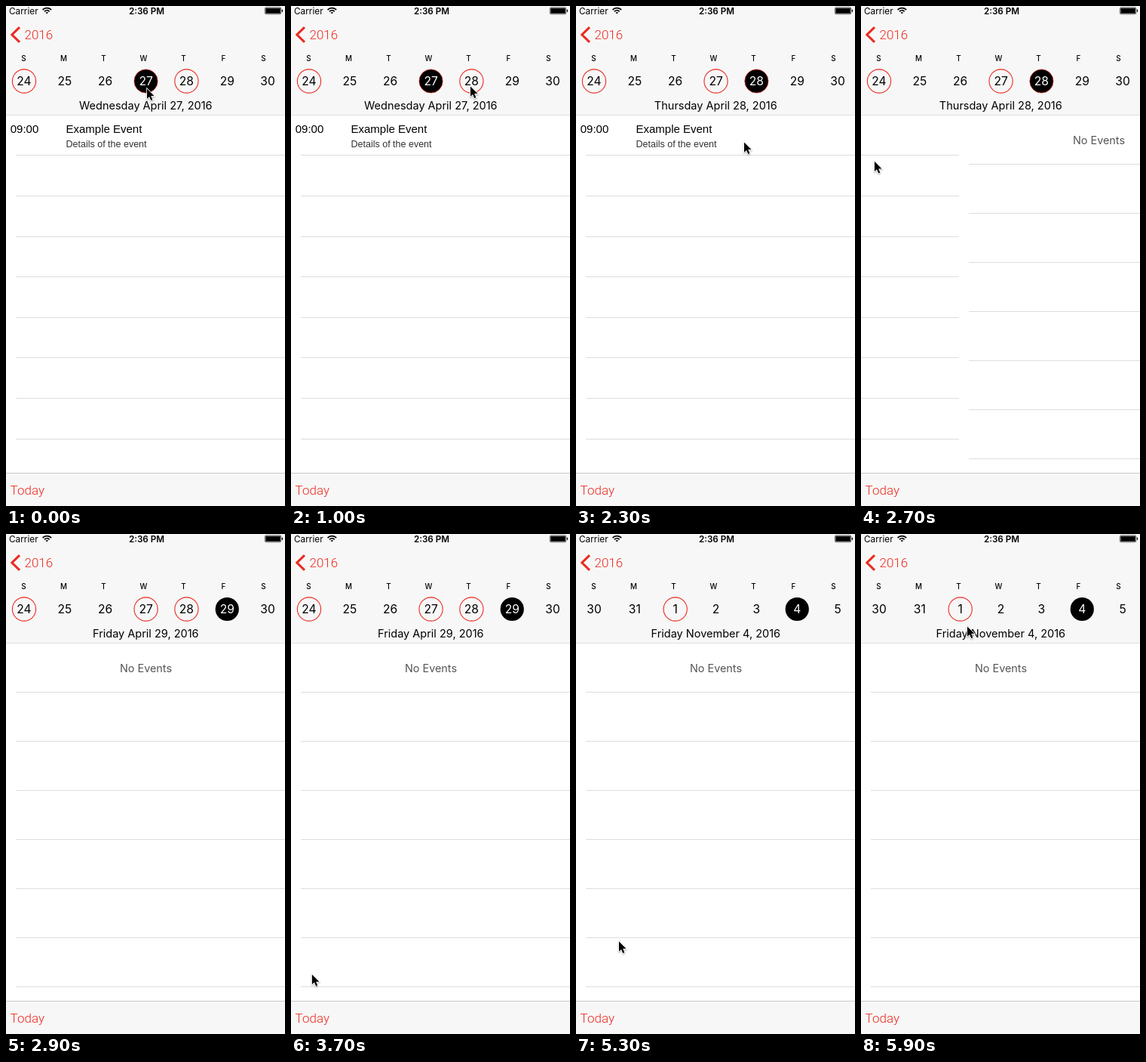
An HTML page with a canvas that plays this animation: 370 px wide and 662 px high, repeating every 6.1 s.

```html
<!DOCTYPE html>
<html lang="en">
<head>
<meta charset="utf-8">
<title>Calendar day view</title>
<style>
  html, body { margin: 0; width: 100%; height: 100%; overflow: hidden; background: #fff; }
  canvas { display: block; width: 370px; height: 662px; }
</style>
</head>
<body>
<canvas id="stage"></canvas>
<script>
const W = 370, H = 662, LOOP = 6100, TICK = 100;
const RED = '#ec2a20', BAR = '#f7f7f7', LINE = '#dddde0';
const UI = 'Inter, sans-serif';
const BODY = '"Liberation Sans", Arial, sans-serif';
const LIGHT = 'Roboto, sans-serif';

const canvas = document.getElementById('stage');
const ctx = canvas.getContext('2d');
const ratio = window.devicePixelRatio || 1;
canvas.width = W * ratio;
canvas.height = H * ratio;

const DAYS = [
  { from: 0, date: new Date(2016, 3, 27) },
  { from: 1700, date: new Date(2016, 3, 28) },
  { from: 2800, date: new Date(2016, 3, 29) },
  { from: 4200, date: new Date(2016, 10, 4) }
];

// Each slide brings in the next day's list from the right.
const SLIDES = [
  { start: 1680, length: 300, from: eventList, to: eventList },
  { start: 2400, length: 500, from: eventList, to: emptyList },
  { start: 4183, length: 300, from: emptyList, to: emptyList }
];

// The pointer rests between moves.
const MOVES = [
  { start: 0, end: 400, x: 36, y: 36 },
  { start: 400, end: 600, x: 236, y: 110 },
  { start: 600, end: 700, x: 198, y: 107 },
  { start: 700, end: 1000, x: 238, y: 106 },
  { start: 1900, end: 2300, x: 223, y: 180 },
  { start: 2400, end: 2800, x: -20, y: 210 },
  { start: 2900, end: 3000, x: 76, y: 262 },
  { start: 3100, end: 3900, x: 19, y: 642 },
  { start: 5100, end: 5300, x: 57, y: 539 },
  { start: 5300, end: 5900, x: 141, y: 122 }
];

const clamp = v => Math.max(0, Math.min(1, v));
const smooth = v => v * v * (3 - 2 * v);
const progress = (t, start, length) => smooth(clamp((t - start) / length));

function text(str, x, y, font, color = '#000', align = 'left') {
  ctx.font = font;
  ctx.fillStyle = color;
  ctx.textAlign = align;
  ctx.fillText(str, x, y);
}

function rect(x, y, w, h, color) {
  ctx.fillStyle = color;
  ctx.fillRect(x, y, w, h);
}

function statusBar() {
  text('Carrier', 4, 10.5, `11.8px ${UI}`);
  text('2:36 PM', 186.5, 10.5, `600 11.7px ${UI}`, '#000', 'center');
  ctx.strokeStyle = ctx.fillStyle = '#000';
  ctx.lineWidth = 1.7;
  for (const r of [1.5, 4.6, 7.9]) {
    ctx.beginPath();
    ctx.arc(54.3, 10.5, r, -Math.PI * 0.76, -Math.PI * 0.24);
    ctx.stroke();
  }
  ctx.lineWidth = 0.6;
  ctx.beginPath();
  ctx.roundRect(343.3, 1.8, 21.6, 9, 2);
  ctx.stroke();
  rect(344.3, 2.8, 19.6, 7, '#000');
  rect(365.8, 4.7, 1.2, 3.2, '#000');
}

function eventful(date) {
  const day = date.getDate();
  return date.getMonth() === 3 ? [24, 27, 28].includes(day) : day === 1;
}

function dayCell(date, i, selected) {
  const x = 24 + i * 53.85, y = 99.5;
  ctx.beginPath();
  ctx.arc(x, y, 15.6, 0, Math.PI * 2);
  if (selected) {
    ctx.fillStyle = '#000';
    ctx.fill();
  }
  if (eventful(date)) {
    ctx.strokeStyle = RED;
    ctx.lineWidth = selected ? 0.7 : 1.1;
    ctx.stroke();
  }
  text(date.getDate(), x, y + 5.7, `15.6px ${UI}`, selected ? '#fff' : '#000', 'center');
}

function title(date) {
  const part = options => date.toLocaleDateString('en-US', options);
  return `${part({ weekday: 'long' })} ${part({ month: 'long', day: 'numeric' })}, ${date.getFullYear()}`;
}

function header(date) {
  rect(0, 0, W, 144, BAR);
  rect(0, 144, W, 1, '#e0e0e0');
  statusBar();

  ctx.beginPath();
  ctx.moveTo(18, 28.2);
  ctx.lineTo(7.9, 38);
  ctx.lineTo(18, 47.8);
  ctx.strokeStyle = RED;
  ctx.lineWidth = 3;
  ctx.stroke();
  text(date.getFullYear(), 24.5, 44, `300 17px ${LIGHT}`, RED);

  for (let i = 0; i < 7; i++) {
    const day = new Date(date);
    day.setDate(date.getDate() - date.getDay() + i);
    text('SMTWTFS'[i], 23.5 + i * 53, 72.5, `500 9.8px ${UI}`, '#000', 'center');
    dayCell(day, i, i === date.getDay());
  }
  text(title(date), 185.3, 136.5, `14.5px ${UI}`, '#000', 'center');
}

function rows(x, top, height) {
  for (let y = top + height; y < 618; y += height) rect(x + 13, Math.round(y), W - 13, 1, LINE);
}

function eventList(x) {
  rows(x, 143.8, 53.6);
  text('09:00', x + 5.7, 167.5, `15px ${BODY}`);
  text('Example Event', x + 79.5, 167.5, `15px ${BODY}`);
  text('Details of the event', x + 79.5, 186.5, `12.5px ${BODY}`, '#333');
}

function emptyList(x) {
  rows(x, 144, 65);
  text('No Events', x + 185.5, 182.5, `14.4px ${UI}`, '#555', 'center');
}

function pages(t) {
  const slide = SLIDES.findLast(s => s.start <= t) || SLIDES[0];
  const offset = Math.round(-W * progress(t, slide.start, slide.length));
  slide.from(offset);
  slide.to(offset + W);
}

function toolbar(t) {
  rect(0, 618, W, 44, BAR);
  rect(0, 618, W, 1, '#cbcbcb');
  const pressed = t >= 3900;
  ctx.globalAlpha = pressed ? 0.2 + 0.8 * clamp((t - 4200) / 500) : 1;
  text('Today', 5.6, 647, `300 17px ${LIGHT}`, RED);
  ctx.globalAlpha = 1;
}

function pointerAt(t) {
  let x = 187, y = 109;
  for (const move of MOVES) {
    const u = progress(t, move.start, move.end - move.start);
    x += (move.x - x) * u;
    y += (move.y - y) * u;
  }
  return [x, y];
}

function pointer(x, y) {
  ctx.save();
  ctx.translate(x, y + 0.5);
  ctx.shadowColor = 'rgba(0,0,0,.35)';
  ctx.shadowBlur = 2 * ratio;
  ctx.shadowOffsetY = ratio;
  ctx.strokeStyle = '#fff';
  ctx.lineWidth = 1.6;
  const arrow = new Path2D('M0 0V13.2L3 10.4L5.3 15.6L7.4 14.7L5.2 9.6H9.5Z');
  ctx.stroke(arrow);
  ctx.shadowColor = 'transparent';
  ctx.fillStyle = '#000';
  ctx.fill(arrow);
  ctx.restore();
}

function draw(t) {
  ctx.setTransform(ratio, 0, 0, ratio, 0, 0);
  rect(0, 0, W, H, '#fff');
  pages(t);
  header(DAYS.findLast(day => day.from <= t).date);
  toolbar(t);
  pointer(...pointerAt(t));
}

const start = performance.now();
function frame() {
  const t = (performance.now() - start) % LOOP;
  draw(Math.floor(t / TICK) * TICK);
  requestAnimationFrame(frame);
}
frame();
</script>
</body>
</html>
```
